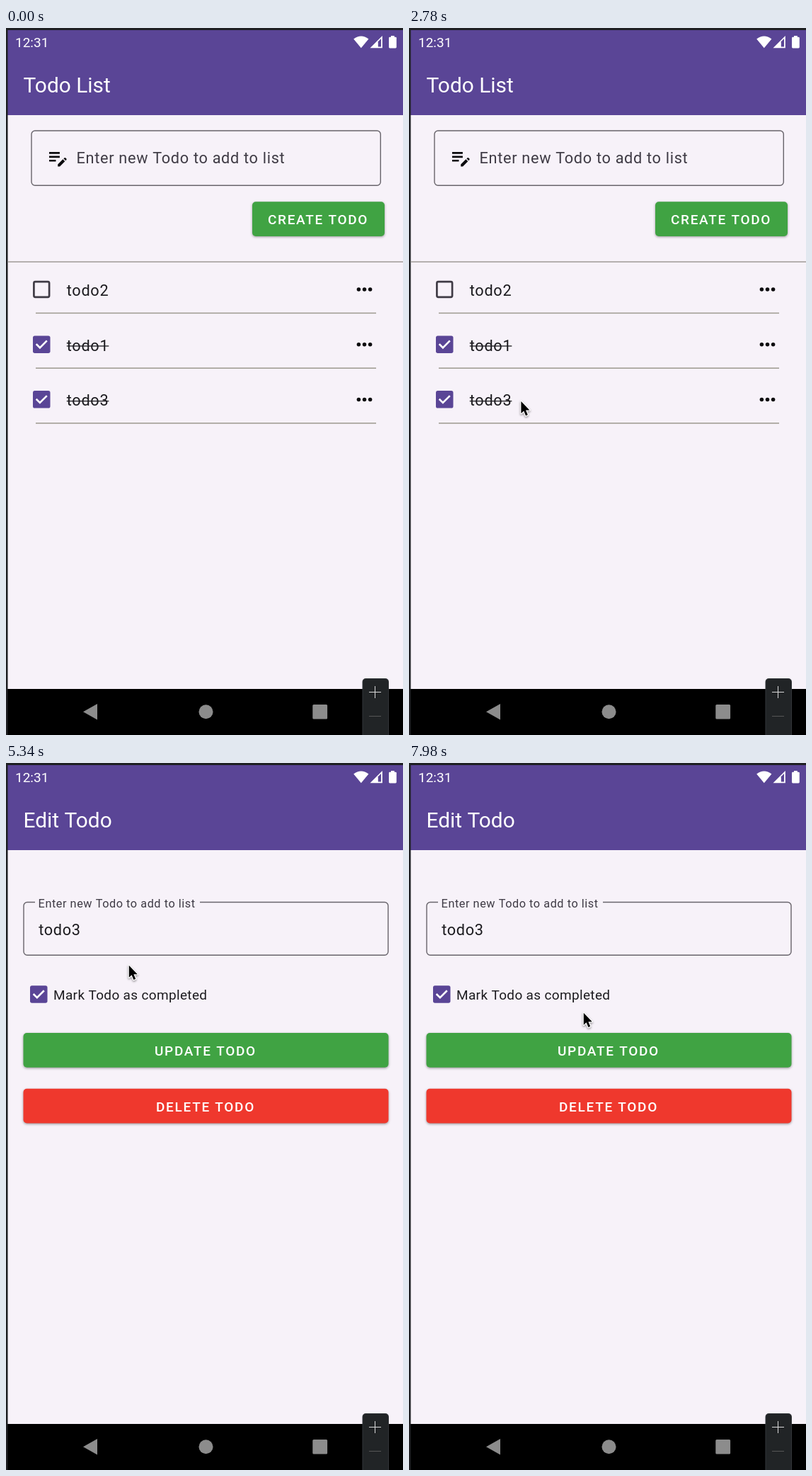
Animation of 561x998 px, one loop 8 s. Source, as an HTML page with a canvas:

```html
<!DOCTYPE html>
<html lang="en">
<head>
<meta charset="utf-8">
<title>Todo List</title>
<style>
  html, body { margin: 0; width: 100%; height: 100%; overflow: hidden; background: #1f2023; }
  canvas { display: block; width: 561px; height: 998px; }
</style>
</head>
<body>
<canvas id="stage" width="561" height="998"></canvas>
<script>
const ctx = document.getElementById('stage').getContext('2d');
const LOOP = 8000;
const DP = 1.3577; // pixels per density-independent unit
const PURPLE = '#5a4596', PAPER = '#f7f2f9', INK = '#1c1b1f', MUTED = '#3f3b45';
const GREEN = '#40a343', RED = '#ef382d';

const OPEN_AT = 4420, LABEL_MS = 180;
const RIPPLE_AT = 3740;
const ENTER_AT = 780;

// Pointer tip: time, x, y
const PATH = [
  [780, 262, 998], [1250, 171, 506], [1640, 171, 510], [2300, 163, 519],
  [2900, 157, 527], [4720, 157, 527], [5260, 173, 285], [5480, 173, 285],
  [6100, 196, 216], [7050, 196, 216], [7800, 246, 352], [8000, 246, 352]
];

const PENCIL = new Path2D('M3 10h11v2H3zM3 8h11V6H3zM3 16h7v-2H3z' +
  'M18.01 12.87l.71-.71a1 1 0 0 1 1.41 0l.71.71c.39.39.39 1.02 0 1.41l-.71.71z' +
  'M17.3 13.58l-5.3 5.3V21h2.12l5.3-5.3z');
const POINTER = new Path2D('M0 0V17L3.8 13.5L6.6 20.2L9.4 19L6.6 12.5H12Z');

const lerp = (a, b, p) => a + (b - a) * p;
const clamp = p => Math.max(0, Math.min(1, p));
const ease = p => p * p * (3 - 2 * p);

function rect(x, y, w, h, color) {
  ctx.fillStyle = color;
  ctx.fillRect(x, y, w, h);
}

function round(x, y, w, h, r, color) {
  ctx.beginPath();
  ctx.roundRect(x, y, w, h, r);
  ctx.fillStyle = color;
  ctx.fill();
}

function disc(x, y, r, color) {
  ctx.beginPath();
  ctx.arc(x, y, r, 0, 2 * Math.PI);
  ctx.fillStyle = color;
  ctx.fill();
}

function line(points, color, width) {
  ctx.beginPath();
  points.forEach(([x, y]) => ctx.lineTo(x, y));
  ctx.strokeStyle = color;
  ctx.lineWidth = width;
  ctx.stroke();
}

function shape(points, color) {
  ctx.beginPath();
  points.forEach(([x, y]) => ctx.lineTo(x, y));
  ctx.fillStyle = color;
  ctx.fill();
}

// Size and spacing are in scale units
function text(str, x, y, size, spacing, color, weight = 400) {
  ctx.font = `${weight} ${size * DP}px Roboto, sans-serif`;
  ctx.letterSpacing = `${spacing * DP}px`;
  ctx.fillStyle = color;
  ctx.fillText(str, x, y);
  return ctx.measureText(str).width;
}

function button(label, x, y, w, textX, color) {
  ctx.save();
  ctx.shadowColor = 'rgba(0,0,0,.38)';
  ctx.shadowBlur = 3.5;
  ctx.shadowOffsetY = 1.2;
  round(x, y, w, 48.7, 5, color);
  ctx.restore();
  text(label, textX, y + 31.8, 14, 1.25, '#fff', 500);
}

function checkbox(x, y, checked) {
  if (!checked) {
    ctx.beginPath();
    ctx.roundRect(x + 1.4, y + 1.4, 21.7, 21.7, 2);
    ctx.strokeStyle = MUTED;
    ctx.lineWidth = 2.7;
    ctx.stroke();
    return;
  }
  round(x, y, 24.5, 24.5, 2.7, PURPLE);
  ctx.lineCap = 'square';
  line([[x + 5.6, y + 12.6], [x + 9.9, y + 16.9], [x + 18.9, y + 7.9]], '#fff', 2.6);
  ctx.lineCap = 'butt';
}

function statusIcons() {
  ctx.beginPath();
  ctx.moveTo(501.8, 28.3);
  ctx.lineTo(491.2, 15.4);
  ctx.quadraticCurveTo(501.8, 7.6, 512.4, 15.4);
  ctx.closePath();
  ctx.fillStyle = '#fff';
  ctx.fill();

  shape([[514.5, 28.3], [531.8, 11], [531.8, 28.3]], '#fff');
  shape([[525.8, 26.6], [525.8, 19.3], [530, 15.1], [530, 26.6]], PURPLE);

  round(541, 12.8, 10.8, 15.6, 1.4, '#fff');
  rect(544, 11, 4.8, 3, '#fff');
}

function frame(title) {
  rect(0, 0, 561, 998, '#1f2023');
  rect(2.5, 3, 558.5, 120, PURPLE);
  rect(2.5, 123, 558.5, 810, PAPER);
  text('12:31', 13, 27, 14, 0, '#fff');
  statusIcons();
  text(title, 24.5, 91, 22, 0, '#fff');
}

function navBar() {
  const grey = '#8c8c8c';
  rect(2.5, 933, 558.5, 65, '#000');
  shape([[109, 965.3], [129, 954], [129, 976.6]], grey);
  disc(282.5, 965.3, 10, grey);
  round(433.3, 955, 20.8, 20.6, 1.5, grey);

  round(503.5, 918, 37.5, 90, 5, '#33363a');
  round(504.5, 919, 35.5, 90, 4, '#212426');
  rect(513, 937, 17, 1, '#d8d8d8');
  rect(521, 929, 1, 17, '#d8d8d8');
  rect(513, 971, 17, 1, '#565656');
}

function ripple(t) {
  const age = t - RIPPLE_AT;
  if (age < 0) return;
  const alpha = .105 * clamp(age / 75) * (1 - clamp((age - 300) / 200));
  disc(57, 525, lerp(9, 21, ease(clamp(age / 150))), `rgba(28,27,31,${alpha})`);
}

function listScreen(t) {
  frame('Todo List');
  ctx.beginPath();
  ctx.roundRect(36, 145, 493.3, 77.3, 5);
  ctx.strokeStyle = '#68646b';
  ctx.lineWidth = 1.4;
  ctx.stroke();

  ctx.save();
  ctx.translate(56.9, 166.9);
  ctx.scale(DP, DP);
  ctx.fillStyle = '#0c0b0e';
  ctx.fill(PENCIL);
  ctx.restore();

  text('Enter new Todo to add to list', 99.5, 191.2, 16, .5, MUTED);
  button('CREATE TODO', 348, 245.2, 187, 370, GREEN);
  rect(2.5, 329.4, 558.5, 1.4, '#9a9691');
  ripple(t);

  ['todo2', 'todo1', 'todo3'].forEach((name, i) => {
    const y = i * 77.7, done = i > 0;
    checkbox(38, 356.7 + y, done);
    const w = text(name, 85.8, 377.8 + y, 16, .5, INK);
    if (done) rect(85.8, 370.6 + y, w, 1.3, INK);
    for (const dx of [-8.1, 0, 8.1]) disc(506.5 + dx, 369 + y, 2.75, '#0c0b0e');
    rect(42, 401.7 + y, 481, 1.5, '#9d9a8f');
  });
}

function editScreen(t) {
  frame('Edit Todo');
  const p = ease(clamp((t - OPEN_AT + 20) / LABEL_MS));
  ctx.beginPath();
  ctx.roundRect(25, 196.5, 515, 74.7, 5);
  ctx.strokeStyle = '#68646b';
  ctx.lineWidth = 1.4;
  ctx.stroke();
  rect(41, 195, 233, 3, PAPER);

  text('Enter new Todo to add to list', 45.6, lerp(243, 203.8, p),
    lerp(16, 12, p), lerp(.5, .4, p), MUTED);
  text('todo3', 46.2, 242.6, 16, .5, INK);

  checkbox(34, 314.3, true);
  text('Mark Todo as completed', 67, 333.8, 14, .25, INK);
  button('UPDATE TODO', 24.5, 381, 516, 210, GREEN);
  button('DELETE TODO', 24.5, 459.8, 516, 212, RED);
}

function pointer(t) {
  if (t < ENTER_AT) return;
  const i = PATH.findIndex(k => k[0] > t);
  const [t0, x0, y0] = PATH[i - 1], [t1, x1, y1] = PATH[i];
  const p = ease((t - t0) / (t1 - t0));
  ctx.save();
  ctx.translate(lerp(x0, x1, p) + .8, lerp(y0, y1, p) + .8);
  ctx.lineJoin = 'round';
  ctx.shadowColor = 'rgba(0,0,0,.4)';
  ctx.shadowBlur = 3;
  ctx.shadowOffsetY = 1.5;
  ctx.strokeStyle = '#fff';
  ctx.lineWidth = 2.6;
  ctx.stroke(POINTER);
  ctx.shadowColor = 'transparent';
  ctx.fillStyle = '#000';
  ctx.fill(POINTER);
  ctx.restore();
}

function draw(t) {
  (t < OPEN_AT ? listScreen : editScreen)(t);
  navBar();
  pointer(t);
}

const start = performance.now();
function tick() {
  draw((performance.now() - start) % LOOP);
  requestAnimationFrame(tick);
}
tick();
</script>
</body>
</html>
```
